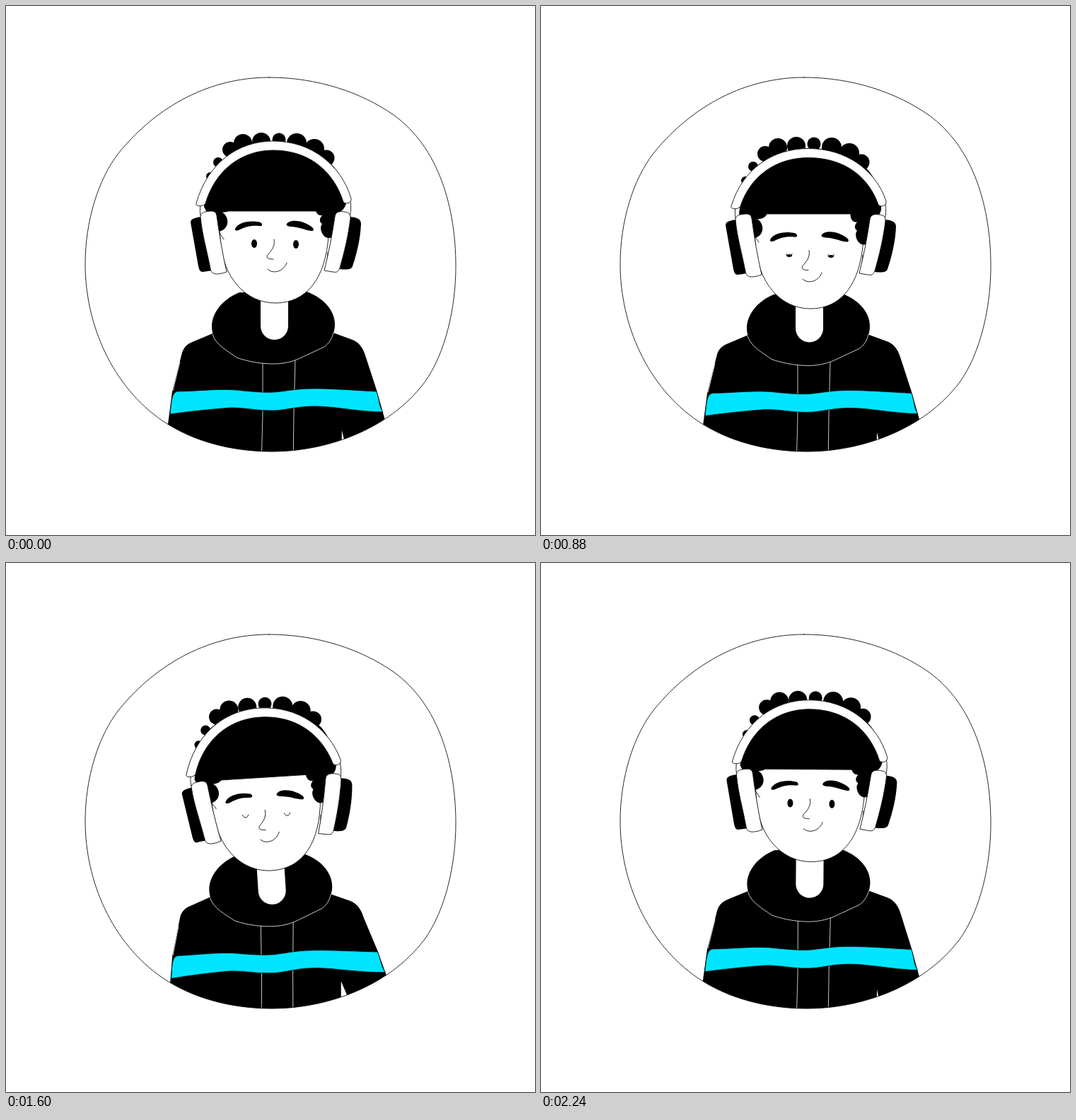
Write an HTML page that moves like this. It is 748x748 px and loops after 2.32 s.

```html
<!DOCTYPE html>
<html lang="en">
<head>
<meta charset="utf-8">
<title>Nodding listener</title>
<style>
  html, body { margin: 0; width: 100%; height: 100%; overflow: hidden; background: #fff; }
  svg { display: block; width: 100vw; height: 100vh; }
  .line { fill: none; stroke: #111; stroke-width: .9; stroke-linecap: round; }
  .white { fill: #fff; stroke: #111; stroke-width: .9; }
  .seam { fill: none; stroke: #ddd; stroke-width: .9; }
</style>
</head>
<body>
<svg viewBox="0 0 748 748">
  <defs>
    <path id="disc" d="M372 101C440 101 502 122 548 154C612 200 636 285 636 368C636 425 622 490 592 532C540 601 450 630 376 630C320 630 265 616 222 587C150 538 112 450 112 365C112 305 130 245 160 207C215 140 290 101 372 101Z"/>
    <clipPath id="inside"><use href="#disc"/></clipPath>
  </defs>

  <g clip-path="url(#inside)">
    <g id="body">
      <path id="torso"/>
      <path id="sleeve" class="seam"/>
      <path id="gap" fill="#fff"/>
      <path class="seam" d="M363 500V560C363 590 362 610 361 650M409 500L407 575L406 650"/>
      <path id="stripe" fill="#00e5ff" stroke="#111" stroke-width=".8"/>
      <path id="collar" d="M330 405C305 415 291 435 291 453C291 477 312 487 326 497C345 504 365 506 378 506C395 506 408 502 420 496L450 482C460 474 465 462 465 450C465 430 448 412 425 404Z"/>
      <path class="seam" d="M292 464C297 480 314 488 326 497C345 504 365 506 378 506C395 506 408 502 420 496L450 482C457 477 461 470 463 462"/>
    </g>
  </g>
  <use href="#disc" class="line"/>

  <g id="neck"><rect x="360" y="390" width="39" height="82" rx="19.5" fill="#fff"/></g>
  <g id="head">
    <g id="backHair"><ellipse cx="381" cy="257" rx="94" ry="62"/></g>
    <path class="white" d="M275 281C274 288 274 293 276 300L300 300V281ZM487 276C488 284 488 290 486 298L465 298V276Z"/>
    <path id="face" class="white"/>
    <path class="line" d="M302 321L308 330M455 348L453 372"/>
    <path id="frontHair" d="M280 284C285 240 320 198 378 198C430 198 470 230 481 274C482 284 475 290 470 293L462 326C460 328 456 329 452 327C448 325 442 315 447 308C445 307 441 303 447 296C440 297 436 290 438 281C430 286 424 280 426 270C418 274 409 268 411 258C405 259 398 262 393 265C398 266 399 278 390 277C389 284 383 286 379 276C370 282 364 276 368 262C366 268 356 268 353 258C350 264 338 264 335 255C336 266 332 275 316 276C322 281 321 291 306 292C315 297 317 313 304 318L296 320L284 292Z"/>
    <g id="features">
      <path d="M324 315C328 306 345 302 360 306C364 309 362 312 358 311C345 310 337 313 329 317C325 318 323 317 324 315Z"/>
      <path d="M397 308C400 303 412 302 423 307C432 311 437 315 434 318C428 319 415 312 402 312C397 311 396 310 397 308Z"/>
      <g id="eyes"></g>
      <path class="line" d="M379 330C381 340 375 346 370 352C367 357 372 358 378 358"/>
      <path id="mouth" class="line" d="M370 372C376 379 392 377 397 363"/>
    </g>
    <path id="band" class="white"/>
    <path d="M261 306C261 300 270 299 276 298L293 373C288 375 282 375 278 376C274 376 273 372 272 368ZM487 298C494 299 502 300 502 308C501 330 496 350 490 368C488 373 482 373 472 372Z"/>
    <path class="white" d="M275 298C275 292 280 291 289 290C296 290 297 292 298 297C302 325 306 350 312 376C306 378 302 379 297 379C291 378 290 376 289 371C284 345 277 322 275 298ZM465 298C466 291 471 290 478 291C485 292 487 293 487 300C484 325 478 350 472 370C470 376 468 377 462 376L450 374C456 350 461 325 465 298Z"/>
  </g>
</svg>

<script>
const LOOP = 2320, STEP = 80;
const el = id => document.getElementById(id);
const clamp = v => Math.max(0, Math.min(1, v));

// [time, value] keys; smooth, flat at every turning point
const bobKeys = [[0, 0], [320, 13], [540, 0], [750, 13], [880, 4], [970, 0], [1190, 14.5], [1400, 0],
  [1620, 13], [1830, 0], [2060, 9], [2240, 1.8], [LOOP, 0]];
const nodKeys = [[0, 0], [320, 1], [560, 0], [780, 1], [880, .5], [1000, 0], [1230, .6], [1440, 0],
  [1600, .27], [1660, .4], [1870, 0], [2110, .25], [2240, .08], [LOOP, 0]];
const tiltKeys = [[0, 0], [960, 0], [1200, -4.5], [1400, -7], [1600, -3.6], [1840, 6.5], [1930, 7.5],
  [2000, 7.2], [2240, .4], [LOOP, 0]];
const blinks = [320, 950, 1600];

function sample(keys, t) {
  const i = Math.max(1, keys.findIndex(k => k[0] > t));
  const slope = j => keys[j] && keys[j - 1]
    ? (keys[j][1] - keys[j - 1][1]) / (keys[j][0] - keys[j - 1][0]) : 0;
  const tangent = j => slope(j) * slope(j + 1) <= 0 ? 0
    : 2 * slope(j) * slope(j + 1) / (slope(j) + slope(j + 1));
  const [t0, a] = keys[i - 1], [t1, b] = keys[i];
  const d = t1 - t0, u = (t - t0) / d, v = 1 - u;
  return a * v * v * (1 + 2 * u) + b * u * u * (1 + 2 * v)
    + d * u * v * (v * tangent(i - 1) - u * tangent(i));
}

function add(parent, tag, attrs) {
  const node = document.createElementNS("http://www.w3.org/2000/svg", tag);
  for (const name in attrs) node.setAttribute(name, attrs[name]);
  return parent.appendChild(node);
}
const set = (id, name, value) => el(id).setAttribute(name, value);
const move = (id, value) => set(id, "transform", value);

[[300, 221, 7], [289, 241, 6], [317, 203, 11], [335, 194, 13], [361, 192, 13], [386, 189, 9.5],
  [411, 194, 14], [436, 202, 14], [453, 215, 11.5]]
  .forEach(([cx, cy, r]) => add(el("backHair"), "circle", { cx, cy, r }));

const eyes = [[351, 336], [410, 337]].map(([x, y]) => ({
  y,
  ball: add(el("eyes"), "ellipse", { cx: x, cy: y, rx: 4 }),
  lid: add(el("eyes"), "path", { class: "line", d: `M${x - 4} ${y - 1}c0 5 8 5 8 0` })
}));

function drawBody(bob, tilt) {
  move("body", `translate(0 ${bob * .61}) rotate(${tilt * .3} 379 650)`);
  const left = (x, y) => `${x - .009 * tilt * (y - 480)} ${y} `;
  const right = (x, y) => `${x - .015 * tilt * (y - 480)} ${y} `;
  set("torso", "d", `M${left(216, 700)}L${left(229, 591)}L${left(235, 545)}L${left(249, 490)}`
    + `C252 481 258 477 266 474L297 461H460L490 472C502 477 506 487 509 497`
    + `L${right(524, 543)}L${right(535, 582)}L${right(556, 700)}Z`);
  set("sleeve", "d", `M${left(246, 503)}L${left(236, 544)}`);
  set("gap", "d", `M475 ${600 + 4 * tilt}L474 640H${Math.max(474, 484 - 3.7 * tilt)}Z`);
  set("stripe", "d", `M${left(232, 577)}C${left(234, 560)}${left(234, 546)}${left(243, 545)}`
    + `C262 545 300 541 325 543C345 545 365 547 380 546C400 544 412 541 435 541`
    + `C465 541 500 544 ${right(524, 545)}C${right(528, 558)}${right(528, 568)}${right(533, 574)}`
    + `C500 574 465 566 437 566C410 566 395 572 376 572C352 572 340 568 318 568`
    + `C290 570 262 573 ${left(232, 577)}Z`);
}

function drawHead(bob, nod, tilt) {
  const turn = `rotate(${tilt} 379 505)`;
  const squash = nod * clamp(1 - Math.abs(tilt) / 4.5);
  const s = 13 * squash, chin = 420 + 8 * nod;
  move("neck", `translate(0 ${bob * .85}) ${turn}`);
  move("head", `translate(0 ${bob}) ${turn}`);
  move("backHair", `translate(0 ${4 * squash - Math.abs(tilt) * .8})`);
  move("frontHair", `translate(0 ${11 * nod})`);
  move("features", `translate(${.6 * tilt} ${23 * nod})`);
  move("mouth", `translate(0 ${-3 * nod})`);
  set("face", "d", `M300 290L303 330C306 ${chin - 35} 340 ${chin} 381 ${chin}`
    + `C425 ${chin} 452 ${chin - 35} 456 325V290Z`);
  set("band", "d", `M269 279C285 ${222 + s * .6} 328 ${191 + s} 378 ${191 + s}`
    + `C432 ${191 + s} 474 ${225 + s * .6} 488 272C489 279 480 281 477 277`
    + `C462 ${230 + s * .6} 425 ${204 + s} 378 ${204 + s}`
    + `C330 ${204 + s} 295 ${235 + s * .6} 282 279C280 284 267 284 269 279Z`);
}

function drawEyes(t) {
  const open = Math.min(...blinks.map(c => clamp((Math.abs(t - c) - 40) / 100)));
  for (const { y, ball, lid } of eyes) {
    ball.setAttribute("ry", 6 * open);
    ball.setAttribute("cy", y + 2 * (1 - open));
    lid.style.display = open < .5 ? "" : "none";
  }
}

function draw(t) {
  const bob = sample(bobKeys, t), nod = sample(nodKeys, t), tilt = sample(tiltKeys, t);
  drawBody(bob, tilt);
  drawHead(bob, nod, tilt);
  drawEyes(t);
}

const start = performance.now();
function tick() {
  const t = (performance.now() - start) % LOOP;
  draw(Math.floor(t / STEP) * STEP);
  requestAnimationFrame(tick);
}
tick();
</script>
</body>
</html>
```
